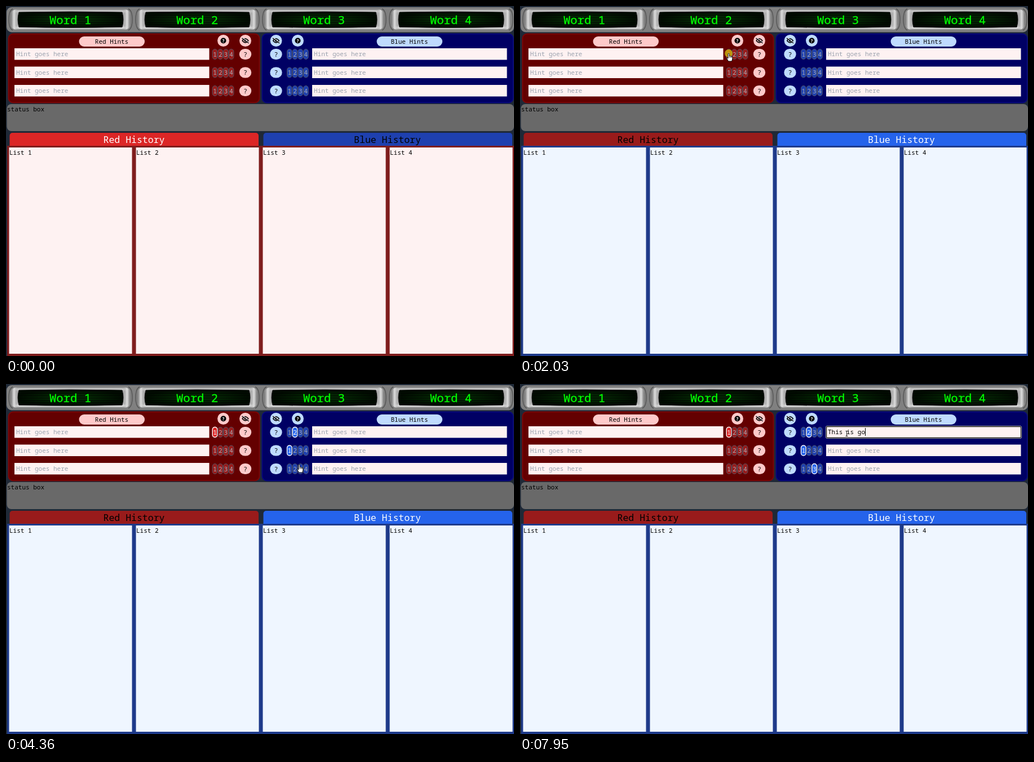
Recreate the animation shown at these times as an HTML page. Size 901 by 621 pixels, loop 8 s.

```html
<!DOCTYPE html>
<html lang="en">
<head>
<meta charset="utf-8">
<title>Word game board</title>
<style>
  html, body { margin: 0; width: 100%; height: 100%; overflow: hidden; background: #1f2937; }
  svg { display: block; width: 901px; height: 621px; font: 11px "Noto Sans Mono", monospace; }
  text { white-space: pre; }
  .mid { text-anchor: middle; }
  .word { font-size: 20.6px; fill: #0f0; stroke: #0f0; stroke-width: .3; }
  .title { font-size: 16.5px; }
  .hint { fill: #9ca3af; }
  .num rect { stroke: #4f5666; }
  .num text { fill: #a8adb8; }
  .num.on rect { stroke: #fff; stroke-width: 1.4; }
  .num.on text { fill: #fff; }
  .num.red rect { fill: #991b1b; }
  .num.red.on rect { fill: #dc2626; }
  .num.blue rect { fill: #1e40af; }
  .num.blue.on rect { fill: #2563eb; }
  #frame { fill: #7f1d1d; }
  .column { fill: #fef2f2; }
  #redTab { fill: #dc2626; }
  #redTitle { fill: #fff; }
  #blueTab { fill: #1e40af; }
  .blueView #frame { fill: #1e3a8a; }
  .blueView .column { fill: #eff6ff; }
  .blueView #redTab { fill: #991b1b; }
  .blueView #redTitle { fill: #000; }
  .blueView #blueTab { fill: #2563eb; }
  .blueView #blueTitle { fill: #fff; }
  .hover #blueTab { fill: #bfdbfe; }
  .hover #blueTitle { fill: #000; }
</style>
</head>
<body>
<svg id="stage" viewBox="0 0 901 621">
  <defs>
    <linearGradient id="metal" x2="0" y2="1">
      <stop offset="0" stop-color="#8c8c8c"/><stop offset=".08" stop-color="#cfcfcf"/>
      <stop offset=".2" stop-color="#a8a8a8"/><stop offset=".8" stop-color="#b0b0b0"/>
      <stop offset=".92" stop-color="#e6e6e6"/><stop offset="1" stop-color="#8a8a8a"/>
    </linearGradient>
    <linearGradient id="ends">
      <stop offset="0" stop-color="#808080"/><stop offset=".025" stop-color="#dedede"/>
      <stop offset=".06" stop-color="#999" stop-opacity="0"/>
      <stop offset=".94" stop-color="#999" stop-opacity="0"/>
      <stop offset=".975" stop-color="#dedede"/><stop offset="1" stop-color="#808080"/>
    </linearGradient>
    <pattern id="scan" width="8" height="3" patternUnits="userSpaceOnUse">
      <rect width="8" height="3" fill="#000"/><rect width="8" height="1.4" fill="#064206"/>
    </pattern>
    <radialGradient id="vignette">
      <stop offset=".4" stop-color="#000" stop-opacity="0"/>
      <stop offset="1" stop-color="#000" stop-opacity=".7"/>
    </radialGradient>
    <path id="glass" d="M23 11Q114 9 206 11Q210 24 206 37.500Q114 39.500 23 37.500Q19 24 23 11Z"/>
    <g id="screen">
      <path d="M12 5Q5 8 5 24T12 43M217 5Q224 8 224 24T217 43" fill="none" stroke="#555" stroke-width="1.400"/>
      <rect x="9" y="6" width="211" height="36" rx="9" fill="url(#metal)"/>
      <rect x="9" y="6" width="211" height="36" rx="9" fill="url(#ends)"/>
      <use href="#glass" fill="url(#scan)" stroke="#222"/>
      <use href="#glass" fill="url(#vignette)"/>
    </g>
    <g id="help">
      <circle r="5"/>
      <text class="mid" y="3" fill="#fff" font-size="8" font-weight="700">?</text>
    </g>
    <g id="eye" fill="none">
      <path d="M-5.300 0Q0-7 5.300 0Q0 7-5.300 0Z" stroke="#000" stroke-width="1.300"/>
      <circle r="1.900" fill="#000"/>
      <path d="M-5-5L6 3.500" stroke="#e8e4f0" stroke-width="1.200"/>
      <path d="M-6-4.500L6 4.500" stroke="#000" stroke-width="1.300"/>
    </g>
    <g id="arrow">
      <path d="M0 0V10L2.300 8L4 11.600L5.700 10.800L4.100 7.400H7Z" fill="#fff" stroke="#000" stroke-width=".8"/>
    </g>
    <g id="hand">
      <path d="M-1 .5Q0-1 1.200 .5V5Q2.500 4 3.200 5.300Q4.500 4.500 5 5.800Q6.800 5.500 6.800 7.500V10Q6.500 12 5.500 14H-.5Q-2 11-3.500 8.800Q-3.300 7-1 9Z" fill="#fff" stroke="#000" stroke-width=".9"/>
      <path d="M1.200 5V8M3.200 5.500V8M5 6V8" stroke="#000" stroke-width=".6"/>
    </g>
    <g id="beam">
      <path d="M-2-4.500H2M0-4.500V4.500M-2 4.500H2" fill="none" stroke="#222"/>
    </g>
  </defs>
  <g id="board"></g>
  <g id="focus" fill="none">
    <rect x="542.500" y="74.500" width="347" height="22" rx="2.500" stroke="#c8c8c8"/>
    <rect x="543.500" y="75.500" width="345" height="20" rx="1.500" stroke="#101010" stroke-width="1.300"/>
  </g>
  <text id="typed" x="546" y="89"></text>
  <rect id="caret" y="78" width="1" height="14"/>
  <circle id="click" r="7" fill="#e0d000" fill-opacity=".65"/>
  <use id="cursor"/>
</svg>
<script>
const LOOP = 8000;
const ROWS = [85.5, 118, 150.5];
const CHAR = 6.6;
const $ = id => document.getElementById(id);

const rect = (x, y, w, h, r, attrs) =>
  `<rect x="${x}" y="${y}" width="${w}" height="${h}" rx="${r}" ${attrs}/>`;
const text = (x, y, str, attrs = '') => `<text x="${x}" y="${y}" ${attrs}>${str}</text>`;

const SIDES = [
  { name: 'red', label: 'Red Hints', fill: '#640000', edge: '#7c0505', pale: '#fecaca',
    panel: 4.5, labelX: 187.5, input: 15, nums: 370.5, help: 385.5, eye: 424.5 },
  { name: 'blue', label: 'Blue Hints', fill: '#000064', edge: '#07077c', pale: '#bfdbfe',
    panel: 454.5, labelX: 715.5, input: 543, nums: 502.8, help: 517.5, eye: 479 }
];

function hintPanel(s) {
  let out = rect(s.panel, 49.5, 445, 122, 8, `fill="${s.fill}" stroke="${s.edge}" stroke-width="2"`);
  out += rect(s.labelX - 58, 54, 116.5, 18, 9, `fill="${s.pale}"`);
  out += text(s.labelX, 66.5, s.label, 'class="mid"');
  for (const icon of ['help', 'eye']) {
    out += `<circle cx="${s[icon]}" cy="61.5" r="10.5" fill="${s.pale}"/>`;
    out += `<use href="#${icon}" x="${s[icon]}" y="61.5"/>`;
  }
  ROWS.forEach((y, row) => {
    out += rect(s.input, y - 10.5, 345.5, 20.5, 0, 'fill="#fef2f2"');
    out += text(s.input + 3, y + 3.5, 'Hint goes here', `class="hint" id="${s.name}Hint${row}"`);
    out += rect(s.eye - 10.7, y - 9.5, 21.4, 19, 9.5, `fill="${s.pale}"`);
    out += text(s.eye, y + 4, '?', 'class="mid"');
    for (let n = 1; n <= 4; n++) {
      const x = s.nums + (n - 1) * 9.7;
      out += `<g class="num ${s.name}" id="${s.name}${row}-${n}">`
        + rect(x - 4.3, y - 9, 8.6, 18, 4.3, '') + text(x, y + 4, n, 'class="mid"') + '</g>';
    }
  });
  return out;
}

function buildBoard() {
  let out = rect(1, 2, 900, 44.5, 9, 'fill="#808080"');
  for (let i = 0; i < 4; i++) {
    out += `<use href="#screen" x="${i * 225}"/>`;
    out += text(114 + i * 225, 32, `Word ${i + 1}`, 'class="word mid"');
  }
  out += SIDES.map(hintPanel).join('');
  out += rect(1.5, 174, 899.5, 48, 8, 'fill="#696969"') + text(2, 187, 'status box');
  out += rect(6.5, 225, 441.5, 30, 5, 'id="redTab"') + rect(456.5, 225, 441.5, 30, 5, 'id="blueTab"');
  out += text(227, 243, 'Red History', 'class="title mid" id="redTitle"');
  out += text(676.5, 243, 'Blue History', 'class="title mid" id="blueTitle"');
  out += rect(2, 248, 899, 373, 0, 'id="frame"');
  for (let i = 0; i < 4; i++) {
    const x = 5.5 + i * 225;
    out += rect(x, 251, 218, 366, 0, 'class="column"') + text(x + .5, 264, `List ${i + 1}`);
  }
  $('board').innerHTML = out;
}

// Pointer path: time, x, y
const PATH = [
  [190, 735, 590], [740, 604, 264], [810, 599, 247], [950, 599, 247], [1080, 508, 219],
  [1150, 456, 199], [1430, 384, 112], [1770, 370, 84], [2300, 370, 84], [2560, 445, 106],
  [2800, 510.5, 98], [3000, 510.5, 98], [3140, 512, 86], [3400, 512, 86], [3670, 502.5, 118],
  [3950, 502.5, 118], [4360, 520, 143], [4800, 520, 143], [5110, 588, 103], [5310, 588, 103],
  [5450, 579.5, 88], [LOOP, 579.5, 88]
];
const CLICKS = [880, 2030, 3200, 3740, 4560, 5450];
const PICKS = [['red0-1', 2100], ['blue0-2', 3270], ['blue1-1', 3810], ['blue2-3', 4630]];
const VIEW_SWITCH = 950;
const FOCUS = 5510;
const TYPED = 'This is go';
const KEYS = [6780, 6910, 7110, 7230, 7350, 7460, 7580, 7700, 7820, 7950];

function pointerAt(t) {
  const i = PATH.findIndex(p => t < p[0]);
  const [t0, x0, y0] = PATH[i - 1], [t1, x1, y1] = PATH[i];
  const steps = Math.max(1, Math.round((t1 - t0) / 69));
  const u = Math.floor((t - t0) / (t1 - t0) * steps) / steps;
  return [x0 + (x1 - x0) * u, y0 + (y1 - y0) * u];
}

const overTab = y => y > 225 && y < 249;

function cursorShape(x, y) {
  if (overTab(y)) return 'hand';
  const overRow = half => ROWS.some(r => Math.abs(y - r) < half);
  for (const s of SIDES) {
    if (overRow(9.5) && x > s.nums - 5 && x < s.nums + 34) return 'hand';
    if (overRow(10.5) && x > s.input && x < s.input + 345) return 'beam';
  }
  return 'arrow';
}

const show = (id, visible) => $(id).setAttribute('visibility', visible ? 'visible' : 'hidden');

function place(id, attrs) {
  for (const name in attrs) $(id).setAttribute(name, attrs[name]);
}

function render(t) {
  const present = t >= PATH[0][0];
  let hover = false;
  if (present) {
    const [x, y] = pointerAt(t);
    hover = overTab(y) && x > 456;
    place('cursor', { href: '#' + cursorShape(x, y), x, y });
    place('click', { cx: x, cy: y });
  }
  show('cursor', present);
  show('click', CLICKS.some(c => t >= c && t < c + 130));
  $('stage').classList.toggle('hover', hover);
  $('stage').classList.toggle('blueView', t >= VIEW_SWITCH);
  for (const [id, at] of PICKS) $(id).classList.toggle('on', t >= at);

  const count = KEYS.filter(k => t >= k).length;
  show('focus', t >= FOCUS);
  show('blueHint0', count === 0);
  $('typed').textContent = TYPED.slice(0, count);
  place('caret', { x: 546 + count * CHAR });
  show('caret', t >= FOCUS && !(t >= 6050 && t < 6580));
}

buildBoard();
const start = performance.now();
function tick() {
  render((performance.now() - start) % LOOP);
  requestAnimationFrame(tick);
}
tick();
</script>
</body>
</html>
```
